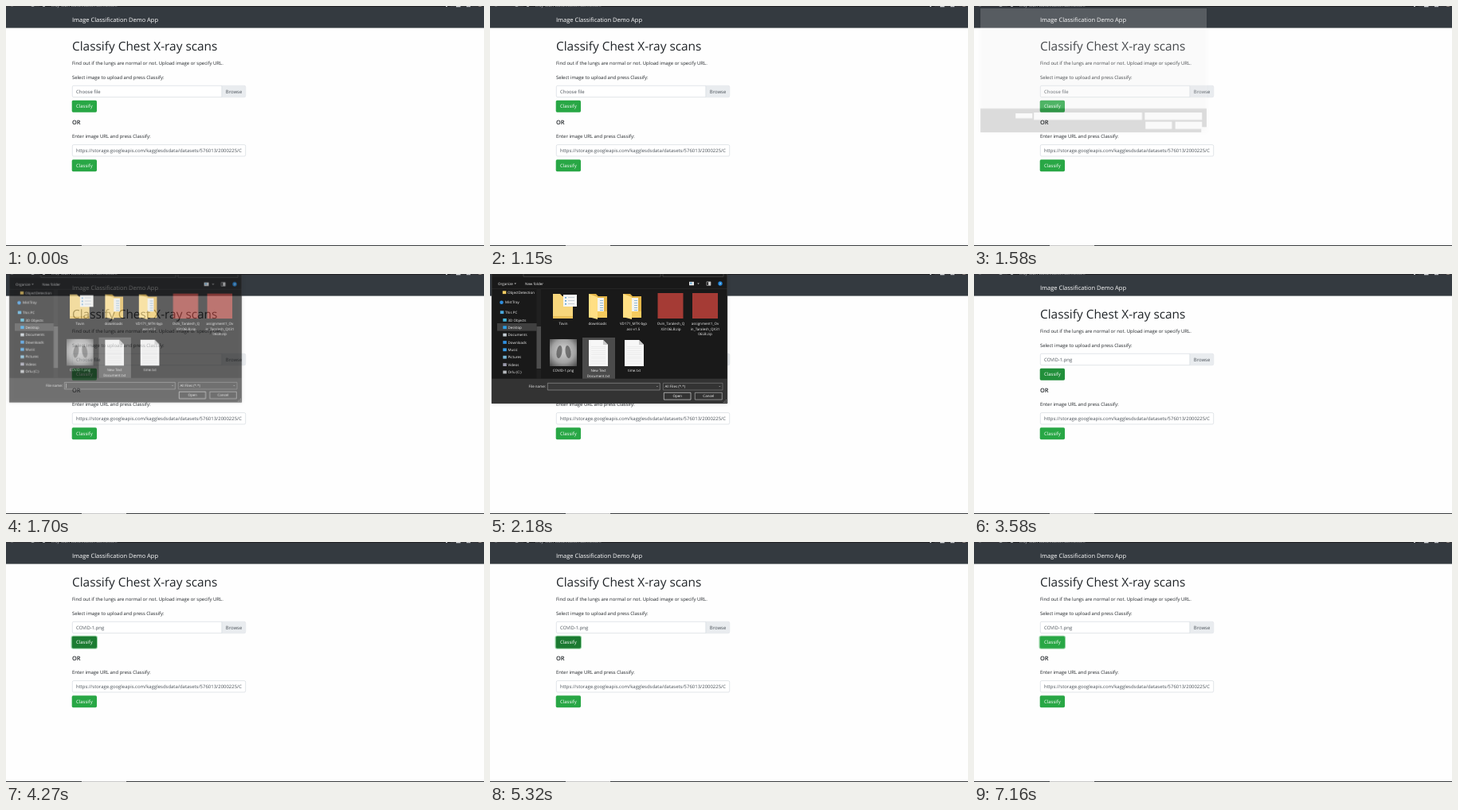
Recreate the animation shown at these times as an HTML page with a canvas. Size 600 px wide and 302 px high, loop 8 s.

```html
<!DOCTYPE html>
<html lang="en">
<head>
<meta charset="utf-8">
<title>Image Classification Demo App</title>
<style>
  html, body { margin: 0; width: 100%; height: 100%; overflow: hidden; background: #fff; }
  canvas { display: block; width: 600px; height: 302px; }
</style>
</head>
<body>
<canvas id="stage"></canvas>
<script>
const W = 600, H = 302, LOOP = 8000;
const FONT = '"Open Sans", "Noto Sans", sans-serif';
const ratio = window.devicePixelRatio || 1;

function sized(canvas, w, h) {
  canvas.width = Math.round(w * ratio);
  canvas.height = Math.round(h * ratio);
  const c = canvas.getContext('2d');
  c.scale(ratio, ratio);
  c.textRendering = 'geometricPrecision';
  return c;
}

const stage = sized(document.getElementById('stage'), W, H);
const panel = document.createElement('canvas');
const PW = 300, PH = 165;
const panelCtx = sized(panel, PW, PH);
let g = stage;

// Drawing helpers
function rect(x, y, w, h, color) {
  g.fillStyle = color;
  g.fillRect(x, y, w, h);
}
function box(x, y, w, h, fill, stroke, radius = 0, line = 0.6) {
  g.beginPath();
  g.roundRect(x, y, w, h, radius);
  if (fill) { g.fillStyle = fill; g.fill(); }
  if (stroke) { g.strokeStyle = stroke; g.lineWidth = line; g.stroke(); }
}
function poly(points, fill) {
  g.beginPath();
  points.forEach(([x, y]) => g.lineTo(x, y));
  g.fillStyle = fill;
  g.fill();
}
function oval(x, y, rx, ry, fill, turn = 0) {
  g.beginPath();
  g.ellipse(x, y, rx, ry, turn, 0, Math.PI * 2);
  g.fillStyle = fill;
  g.fill();
}
function text(str, x, y, size, color, weight = 400, align = 'left') {
  g.font = `${weight} ${size}px ${FONT}`;
  g.textAlign = align;
  g.fillStyle = color;
  g.fillText(str, x, y);
}

// Timing helpers
const ramp = (t, from, to) => Math.min(1, Math.max(0, (t - from) / (to - from)));
function track(t, keys) {
  for (let i = 1; i < keys.length; i++) {
    const [t0, a] = keys[i - 1], [t1, b] = keys[i];
    if (t < t1) return a + (b - a) * ramp(t, t0, t1);
  }
  return keys[keys.length - 1][1];
}
const mix = (a, b, k) => `rgb(${a.map((v, i) => Math.round(v + (b[i] - v) * k))})`;

const GREEN = [40, 167, 69], DARK_GREEN = [27, 122, 49];

function button(y, shade = 0, ring = 0) {
  if (ring > 0) box(82.2, y - 0.4, 32.2, 15.6, null, `rgba(72,180,97,${0.6 * ring})`, 2.2, 1.3);
  box(82.7, y, 31.3, 14.84, mix(GREEN, DARK_GREEN, shade), null, 1.6);
  text('Classify', 98.4, y + 9.6, 5.96, '#fff', 400, 'center');
}

function browserEdge() {
  rect(0, 0, W, 1.4, '#35363a');
  rect(42, 0, 516, 1, '#202124');
  text('xray-scan-classification.demo.com', 57, 1.4, 5.2, '#c8cacd');
  oval(33.5, -0.6, 2.2, 1.7, '#a5a7aa');
  rect(46, 0, 3, 1, '#a5a7aa');
  rect(6, 0, 3, 0.6, '#77797c');
  rect(552, 0, 2, 1, '#c5c7ca');
  rect(565, 0, 5.5, 1.3, '#d8dadc');
  rect(578, 0, 5, 1.2, '#c5c7ca');
  oval(595, -0.6, 2.4, 1.7, '#9a8f88');
}

function page(t) {
  rect(0, 0, W, H, '#fefefe');
  rect(0, 0, W, 27.6, '#343a40');
  browserEdge();
  text('Image Classification Demo App', 83, 19.8, 7.49, '#fff');

  const ink = '#212529', field = '#495057', edge = '#ced4da';
  text('Classify Chest X-ray scans', 83, 56, 15.4, ink, 500);
  text('Find out if the lungs are normal or not. Upload image or specify URL.', 83, 74.2, 5.96, ink);
  text('Select image to upload and press Classify:', 83, 91.7, 5.96, ink);

  box(83.3, 100.3, 217.4, 14.4, '#fff', edge, 1.6);
  box(271, 100.6, 29.5, 13.8, '#e9ecef', null, [0, 1.5, 1.5, 0]);
  rect(270.6, 100.5, 0.6, 14, edge);
  text(t < 3070 ? 'Choose file' : 'COVID-1.png', 88, 109.7, 5.96, field);
  text('Browse', 286, 109.7, 5.96, field, 400, 'center');

  const hover = ramp(t, 3330, 3640), press = ramp(t, 3900, 4330), leave = ramp(t, 6980, 7160);
  button(118.8, (0.65 * hover + 0.35 * press) * (1 - leave), press);

  text('OR', 83, 149.2, 7.4, ink, 600);
  text('Enter image URL and press Classify:', 83, 165.8, 5.96, ink);
  box(83.3, 174.6, 217.4, 14.4, '#fff', edge, 1.6);
  g.save();
  g.beginPath();
  g.rect(88, 175, 208, 14);
  g.clip();
  text('https://storage.googleapis.com/kagglesdsdata/datasets/576013/2000225/COVID', 88, 184.4, 5.96, field);
  g.restore();
  button(193.3);
  rect(0, 301, W, 1, '#3a3d40');
  rect(95, 301, 56, 1, '#c8c8c8');
}

// File dialog
function folder(x) {
  poly([[x - 11, 25], [x - 2, 25], [x + 1, 28], [x + 12, 28], [x + 12, 55], [x - 11, 55]], '#e3b548');
  rect(x, 30, 8, 23, '#f4f4ef');
  for (let y = 33; y < 46; y += 3) rect(x + 3, y, 4, 0.8, '#79a9cf');
  poly([[x - 11, 25], [x, 29], [x, 57], [x - 11, 54]], '#ffdf84');
  poly([[x, 47], [x + 12, 47], [x + 12, 55], [x, 55]], '#f5cb5e');
}
function listFolder(x) {
  poly([[x - 13, 25], [x - 4, 25], [x - 1, 28], [x + 12, 28], [x + 12, 56], [x - 13, 56]], '#f7d67c');
  rect(x - 13, 53, 25, 3, '#e9bf58');
  rect(x, 26, 17, 15, '#f6f6f4');
  for (let y = 29; y < 40; y += 4) {
    rect(x + 2, y, 2, 1.5, '#5c9ed2');
    rect(x + 6, y, 8, 0.8, '#b9c4cc');
  }
}
function sheet(x) {
  poly([[x - 12, 83], [x + 6, 83], [x + 12, 89], [x + 12, 116], [x - 12, 116]], '#f7f7f7');
  poly([[x + 6, 83], [x + 12, 89], [x + 6, 89]], '#c9c9c9');
  for (let y = 91; y < 114; y += 2.6) rect(x - 9, y, 18, 0.5, '#dedede');
}
function scan() {
  const tone = g.createRadialGradient(92, 96, 3, 92, 98, 24);
  tone.addColorStop(0, '#c9c9c9');
  tone.addColorStop(0.55, '#a2a2a2');
  tone.addColorStop(1, '#4c4c4c');
  rect(75, 82, 34, 34, tone);
  oval(87, 98, 3.4, 8, 'rgba(60,60,60,.6)', 0.15);
  oval(98, 98, 3.4, 8, 'rgba(60,60,60,.6)', -0.15);
}
function caption(x, y, ...lines) {
  lines.forEach((line, i) => text(line, x, y + i * 6.3, 4.5, '#f2f2f2', 400, 'center'));
}

const PLACES = [
  ['ObjectDetection', 22, 24.9, '#f2cc62'], ['MistTray', 19, 37.4, '#2f8fe0'],
  ['This PC', 19, 49.9, '#4aa8dc'], ['3D Objects', 22.5, 59.6, '#45b5d8'],
  ['Desktop', 22.5, 68.9, '#2c9fe5'], ['Documents', 22.5, 78.3, '#c4cdd4'],
  ['Downloads', 22.5, 87.7, '#2f8fe0'], ['Music', 22.5, 97, '#3a9ee8'],
  ['Pictures', 22.5, 106.4, '#75b5d5'], ['Videos', 22.5, 115.8, '#9a9aab'],
  ['Orlu (C:)', 22.5, 125.2, '#b5b8bc']
];

function dialog(t) {
  rect(2, 0, 296, 163, '#191919');
  rect(2, 0, 296, 4, '#1e1e1e');
  box(42, -5, 172, 8.4, null, '#555');
  box(217, -5, 76, 8.4, null, '#555');
  text('Organize', 10, 13.7, 4.5, '#f2f2f2');
  poly([[30.5, 11.5], [33, 11.5], [31.7, 13]], '#ccc');
  text('New folder', 44, 13.7, 4.5, '#f2f2f2');
  rect(250, 9.8, 6, 4.5, '#e6e6e6');
  rect(251, 10.6, 2.5, 2, '#5fa8d6');
  poly([[260.3, 11.5], [262.8, 11.5], [261.5, 13]], '#ccc');
  box(272, 9.8, 5, 4.6, null, '#ccc');
  rect(274, 10, 3, 4.2, '#ccc');
  oval(289, 12, 2.7, 2.7, '#1e86dc');
  text('?', 289, 13.7, 4.4, '#fff', 600, 'center');
  rect(2, 18, 296, 0.5, '#303030');

  rect(9, 62, 50, 9.6, '#404040');
  PLACES.forEach(([label, x, y, color], i) => {
    if (i === 1) oval(x - 4.5, y - 1.7, 2.3, 2.3, color);
    else rect(x - 6.2, y - 3.6, 4.5, 3.8, color);
    text(label, x, y, 4.5, '#f2f2f2');
  });
  rect(58.5, 18.5, 5.5, 113, '#202020');
  rect(58.5, 66, 5.5, 53, '#4d4d4d');

  if (t < 2220) rect(116, 80, 41, 52, '#4b4b4b');
  else rect(71.5, 79.5, 42, 47, t < 2300 ? '#4b4b4b' : '#777');

  listFolder(92);
  folder(135);
  folder(178);
  box(210.5, 24, 32, 32, '#a53b35');
  box(254, 24, 32, 32, '#a53b35');
  caption(92, 64.3, 'Tovin');
  caption(135, 64.3, 'downloads');
  caption(180, 64.3, 'VD171_MTK-byp', 'ass-v1.5');
  caption(227, 64.3, 'Ovin_Taralesh_Q', 'X3106LB.zip');
  caption(270, 64.3, 'assignment1_Ov', 'in_Taralesh_QX31', '06LB.zip');
  scan();
  sheet(136);
  sheet(181);
  caption(92, 123.2, 'COVID-1.png');
  caption(136, 123.2, 'New Text', 'Document.txt');
  caption(181, 123.2, 'time.txt');

  rect(2, 131.7, 296, 31.3, '#333');
  text('File name:', 70, 143, 4.5, '#f2f2f2', 400, 'right');
  box(72.3, 137.3, 141, 8.7, '#383838', '#a2a2a2');
  box(217.3, 137.3, 74.7, 8.7, '#333', '#858585');
  text('All Files (*.*)', 219.5, 143.2, 4.5, '#f2f2f2');
  text('⌄', 288.5, 142, 4.5, '#ccc', 400, 'center');
  text('⌄', 210, 142, 4.5, '#ccc', 400, 'center');
  if (t >= 2300) text('COVID-1.png', 74, 143.2, 4.5, '#f2f2f2');
  else if (t < 2000) rect(74, 138.7, 0.5, 6, '#fff');
  box(218.3, 149.3, 33.7, 8.8, '#333', '#f0f0f0');
  box(257.3, 149.3, 34, 8.8, '#333', '#c4c4c4');
  text('Open', 235.2, 155.2, 4.5, '#fff', 400, 'center');
  text('Cancel', 274.3, 155.2, 4.5, '#fff', 400, 'center');
  for (let i = 0; i < 3; i++)
    for (let j = 0; j <= i; j++) rect(296 - j * 1.6, 158 + i * 1.6, 0.8, 0.8, '#aaa');
  box(2.2, -2, 295.6, 164.8, null, '#484848', 0, 0.5);
}

// The window's first paint: white with a grey footer and blank controls.
function blankDialog() {
  rect(2, 0, 296, 131.7, '#fff');
  rect(2, 131.7, 296, 31.3, '#555');
  [[48, 138, 22, 6.5], [72, 137, 141.5, 9.5], [217, 137, 75, 9.5],
   [218, 149, 34.5, 9.5], [257, 149, 35, 9.5], [291, 156, 7, 7]]
    .forEach(r => rect(...r, '#fff'));
}

function showPanel(draw, t, alpha, scale) {
  g = panelCtx;
  g.clearRect(0, 0, PW, PH);
  draw(t);
  g = stage;
  g.save();
  g.globalAlpha = alpha;
  g.shadowColor = 'rgba(0,0,0,.12)';
  g.shadowBlur = 5 * ratio;
  g.translate(150, 65);
  g.scale(scale, scale);
  g.translate(-150, -65);
  g.drawImage(panel, 0, 0, PW, PH);
  g.restore();
}

function render(t) {
  g = stage;
  page(t);
  if (t < 1500 || t >= 3070) return;
  const scale = track(t, [[1500, 0.945], [1580, 0.959], [1720, 0.99], [1820, 1],
    [2830, 1], [2950, 0.973], [3070, 0.93]]);
  if (t < 1640) {
    showPanel(blankDialog, t, track(t, [[1500, 0.05], [1580, 0.18], [1640, 0.3]]), scale);
  } else {
    const alpha = track(t, [[1640, 0.4], [1720, 0.75], [1820, 1], [2820, 1], [2950, 0.39], [3070, 0.03]]);
    showPanel(dialog, t, alpha, scale);
  }
}

const start = performance.now();
function tick() {
  render((performance.now() - start) % LOOP);
  requestAnimationFrame(tick);
}
tick();
</script>
</body>
</html>
```
